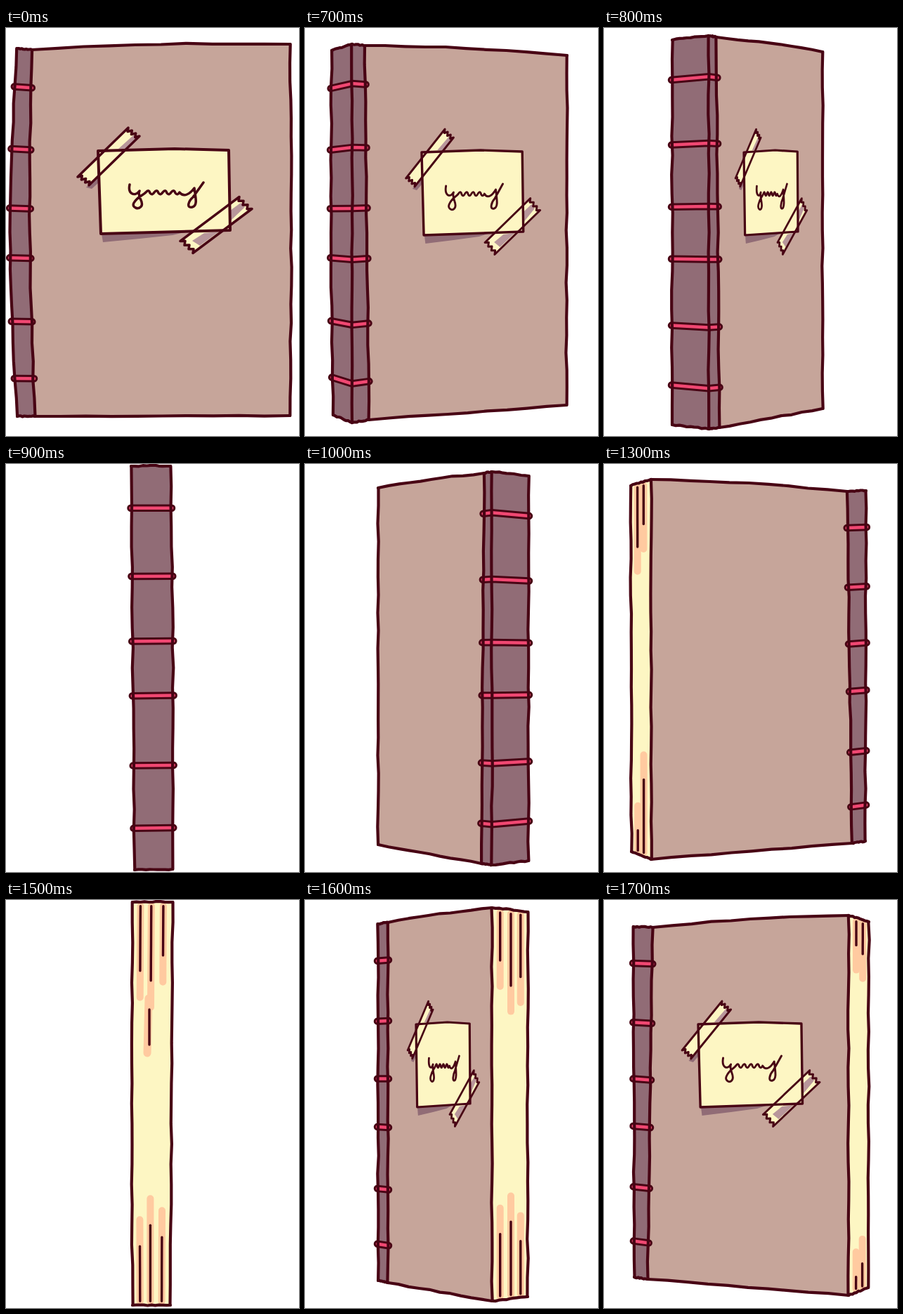
Animation, 417 px wide and 581 px high, one loop 1800 ms. Source, as an HTML page:

```html
<!DOCTYPE html>
<html lang="en">
<head>
<meta charset="utf-8">
<title>Turning notebook</title>
<style>
html, body { margin: 0; width: 100%; height: 100%; overflow: hidden; background: #fff; }
svg { display: block; width: 417px; height: 581px; }
path { stroke-linecap: round; stroke-linejoin: round; vector-effect: non-scaling-stroke; }
.pose { visibility: hidden; animation: turn 1800ms step-end infinite; }
.hold { animation-name: hold; }
@keyframes turn { 0% { visibility: visible; } 5.5556%, 100% { visibility: hidden; } }
@keyframes hold { 0% { visibility: visible; } 38.8889%, 100% { visibility: hidden; } }
</style>
</head>
<body>
<svg id="stage" viewBox="0 0 417 581"></svg>
<script>
const INK = '#480414', TAN = '#c6a59a', MAUVE = '#916c76', RED = '#f04872',
      CREAM = '#fdf6c3', PEACH = '#ffcaa0', SHADE = '#b8969b';
const LOOP = 1800;
const RIBS = [.104, .273, .434, .569, .742, .897];

let seed = 11;
const jitter = size => ((seed = seed * 16807 % 2147483647) / 2147483647 - .5) * size;
const mix = (a, b, t) => a + (b - a) * t;
const blend = (p, q, t) => [mix(p[0], q[0], t), mix(p[1], q[1], t)];
const steps = n => Array.from({ length: n + 1 }, (_, i) => i / n);

const path = pts => 'M' + pts.map(p => p.map(v => v.toFixed(1))).join(' ');
const fillPath = (d, color) => `<path d="${d}" fill="${color}"/>`;
const linePath = (d, w, color = INK) =>
  `<path d="${d}" fill="none" stroke="${color}" stroke-width="${w}"/>`;
const fill = (pts, color) => fillPath(path(pts), color);
const line = (pts, w = 4.2, color) => linePath(path(pts), w, color);

// Upright edge of the book, leaning and bowed sideways, with a shaky hand
function edge([x, top, bottom, lean = 0, bow = 0]) {
  const at = t => [x + lean * t + bow * Math.sin(Math.PI * t), mix(top, bottom, t)];
  const pts = steps(20).map(t => [at(t)[0] + jitter(1.6), at(t)[1]]);
  return { at, pts };
}

// Shaky line from edge to edge
const rim = (a, b, t, lift) => steps(10).map(s => {
  const [x, y] = blend(a.at(t), b.at(t), s);
  const inner = s > 0 && s < 1;
  return [x, y - lift * Math.sin(Math.PI * s) + (inner ? jitter(1.4) : 0)];
});

// Binding thread laid across neighbouring edges
function tie(edges, t, w) {
  const pts = edges.map(e => e.at(t));
  pts[0][0] -= 1;
  pts[pts.length - 1][0] += 1;
  return line(pts, w) + line(pts, w - 6, RED);
}

// Page lines: [place across, length from the top, length from the bottom]
function pageLines(a, b, grain) {
  const part = (u, from, to) => steps(4).map(s => {
    const t = mix(from, to, s);
    return blend(a.at(t), b.at(t), u);
  });
  const draw = (extra, w, color) => grain.map(([u, top, low]) =>
    line(part(u, .01, (top + extra) / 575), w, color) +
    line(part(u, 1 - (low + extra) / 575, .99), w, color)).join('');
  return draw(38, 10, PEACH) + draw(0, 3.4);
}

// A book is a row of edges with one coloured face between each two
function book({ edges, faces }, grain) {
  const list = edges.map(edge);
  let under = '', inked = '';
  faces.forEach((color, i) => {
    const [a, b] = [list[i], list[i + 1]];
    const top = rim(a, b, 0, Math.abs(b.at(0)[0] - a.at(0)[0]) / 90);
    const bottom = rim(a, b, 1, 0);
    under += fill([...a.pts, ...bottom, ...b.pts.slice().reverse(), ...top.slice().reverse()], color);
    if (color === CREAM) under += pageLines(a, b, grain);
    inked += line(top) + line(bottom);
  });
  const spine = list.filter((_, i) => faces[i] === MAUVE || faces[i - 1] === MAUVE);
  const ties = spine.length ? RIBS.map(t => tie(spine, t, 10.5)).join('') : '';
  return under + ties + inked + list.map(e => line(e.pts)).join('');
}

// Strip of tape from p to q with torn ends
function tape(p, q, half, w, shades) {
  const len = Math.hypot(q[0] - p[0], q[1] - p[1]);
  const end = (from, to) => steps(6).map(s => {
    const [x, y] = blend(from, to, Math.round(s * 6) % 2 ? 5 / len : 0);
    return [x + half[0] * (2 * s - 1), y + half[1] * (2 * s - 1)];
  });
  const pts = [...end(p, q), ...end(q, p).reverse()];
  pts.push(pts[0]);
  return fill(pts, CREAM) + shades.map(s => fill(s, SHADE)).join('') + line(pts, w);
}

const scribble = 'M176 223C173 236 183 241 190 232C186 240 196 246 193 253C190 260 178 256 182 249' +
  'C187 240 194 239 199 234' + 'q4 -5 6 1q3 4 6 -1'.repeat(4) +
  'C253 242 262 236 268 228C270 242 273 253 265 255C256 257 260 246 266 241Q274 230 281 220';

// Taped name card, narrowed by scale
function card(scale, x, y, w) {
  const paper = [[131, 175], [240, 172], [317, 174], [319, 288], [135, 293], [131, 175]];
  return `<g transform="matrix(${scale} 0 0 1 ${x - 131 * scale} ${y})">` +
    fill([[136, 293], [262, 289], [237, 295], [190, 300], [138, 305]], MAUVE) +
    fill([[114, 227], [132, 208], [132, 220], [122, 229]], MAUVE) +
    fill(paper, CREAM) +
    tape([110, 218], [182, 148], [8, 6], w - .5, [[[160, 172], [181, 153], [190, 155], [173, 172]]]) +
    tape([257, 312], [341, 249], [9, 8.5], w - .5, [
      [[319, 260], [334, 249], [340, 255], [319, 275]],
      [[265, 303], [282, 292], [303, 290], [276, 310]]]) +
    line(paper, w) + linePath(scribble, w - .5) + '</g>';
}

// Edges: x, top, bottom, lean, bow
const flat = {
  edges: [[16, 29, 553, 0, -10], [37, 31, 553, 4, -5], [404, 23, 552, 0, 2]],
  faces: [MAUVE, TAN]
};
const spineNear = {
  edges: [[38, 32, 551, 2, -2], [67, 23, 562], [85, 25, 558, 6], [373, 39, 537, -1]],
  faces: [MAUVE, MAUVE, TAN]
};
const spineWide = {
  edges: [[97, 17, 565], [149, 11, 571], [160, 13, 569, 4], [311, 34, 542]],
  faces: [MAUVE, MAUVE, TAN]
};
const spine = { edges: [[178, 3, 578, 5], [234, 3, 577, 3, 2]], faces: [MAUVE] };
const pagesNear = {
  edges: [[38, 31, 552, 1], [67, 22, 563], [346, 39, 540, 7], [373, 38, 537, -1]],
  faces: [CREAM, TAN, MAUVE]
};
const pagesWide = {
  edges: [[98, 17, 565], [149, 11, 571], [297, 32, 545], [311, 34, 542]],
  faces: [CREAM, TAN, MAUVE]
};
const pages = { edges: [[180, 3, 577, 0, -1], [237, 3, 577, -3]], faces: [CREAM] };
const grain = [[.2, 98, 84], [.47, 112, 114], [.77, 76, 97]];

const mirror = (art, axis = 415) => `<g transform="matrix(-1 0 0 1 ${axis} 0)">${art}</g>`;

const poses = [
  [0, book(flat) + card(1, 131, 0, 4)],
  [700, book(spineNear) + card(.77, 166, 2, 3.4)],
  [800, book(spineWide) + card(.41, 199, 2, 3.2)],
  [900, book(spine)],
  [1000, mirror(book(spineWide))],
  [1100, mirror(book(spineNear))],
  [1200, mirror(book(flat), 416)],
  [1300, book(pagesNear, [[.33, 98, 37], [.63, 65, 118]])],
  [1400, book(pagesWide, grain)],
  [1500, book(pages, grain) + line([[203, 140], [201, 218]], 11, PEACH) + line([[204, 156], [204, 206]], 3.4)],
  [1600, mirror(book(pagesWide, grain)) + card(.41, 158, 2, 3.2)],
  [1700, mirror(book(pagesNear, [[.3, 53, 41], [.62, 42, 24]])) + card(.79, 134, 2, 3.4)]
];

document.getElementById('stage').innerHTML = poses.map(([start, art]) =>
  `<g class="pose${start ? '' : ' hold'}" style="animation-delay:${start - LOOP}ms">${art}</g>`).join('');
</script>
</body>
</html>
```
